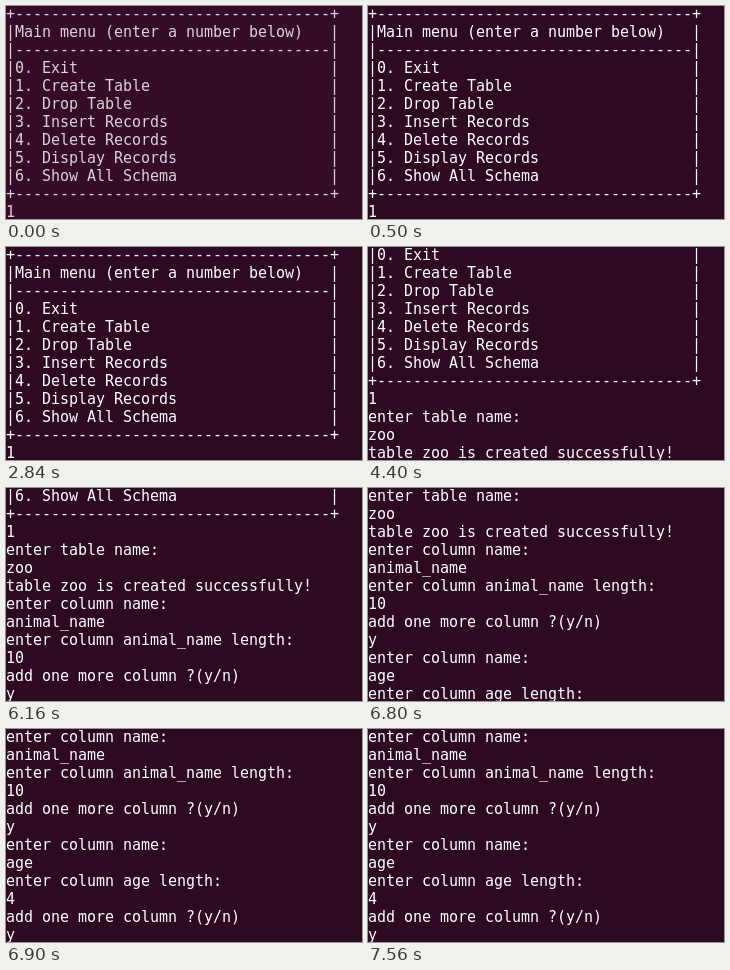
Animation, 356 px wide and 213 px high, one loop 8000 ms. Source, as an HTML page with a canvas:

```html
<!DOCTYPE html>
<html lang="en">
<head>
<meta charset="utf-8">
<title>Terminal session</title>
<style>
html, body { margin: 0; width: 100%; height: 100%; overflow: hidden; background: #2d0922; }
canvas { display: block; }
</style>
</head>
<body>
<canvas id="screen" width="356" height="213"></canvas>
<script>
const ctx = document.getElementById('screen').getContext('2d');
const LOOP = 8000;
const CELL_W = 9, CELL_H = 18, BASELINE = 13, ROWS = 12, INNER = 35;

const boxed = text => `|${text.padEnd(INNER)}|`;
const dashes = '-'.repeat(INNER);
const border = `+${dashes}+`;

const lines = [
  border,
  boxed('Main menu (enter a number below)'),
  boxed(dashes),
  ...['Exit', 'Create Table', 'Drop Table', 'Insert Records', 'Delete Records',
    'Display Records', 'Show All Schema'].map((item, i) => boxed(`${i}. ${item}`)),
  border,
  '1',
  'enter table name:',
  'zoo',
  'table zoo is created successfully!',
  'enter column name:',
  'animal_name',
  'enter column animal_name length:',
  '10',
  'add one more column ?(y/n)',
  'y',
  'enter column name:',
  'age',
  'enter column age length:',
  '4',
  'add one more column ?(y/n)',
  'y'
];

const dim = { back: '#360b28', ink: '#d8d3d6' };
const bright = { back: '#2d0922', ink: '#ffffff' };

// Each state holds until the next one starts; top is the first visible line.
const states = [
  { at: 0, top: 0, theme: dim },
  { at: 500, top: 0, theme: bright },
  { at: 4400, top: 3, theme: bright },
  { at: 5200, top: 9, theme: bright },
  { at: 6800, top: 12, theme: bright },
  { at: 6900, top: 15, theme: bright }
];

function draw({ top, theme }) {
  ctx.fillStyle = theme.back;
  ctx.fillRect(0, 0, 356, 213);
  ctx.fillStyle = theme.ink;
  ctx.font = '15px "DejaVu Sans Mono", monospace';
  lines.slice(top, top + ROWS).forEach((line, row) => {
    [...line].forEach((char, col) => {
      ctx.fillText(char, col * CELL_W, BASELINE + row * CELL_H);
    });
  });
}

const start = performance.now();
let shown = null;

function tick() {
  const time = (performance.now() - start) % LOOP;
  const state = states.filter(s => s.at <= time).pop();
  if (state !== shown) draw(shown = state);
  requestAnimationFrame(tick);
}
tick();
</script>
</body>
</html>
```
